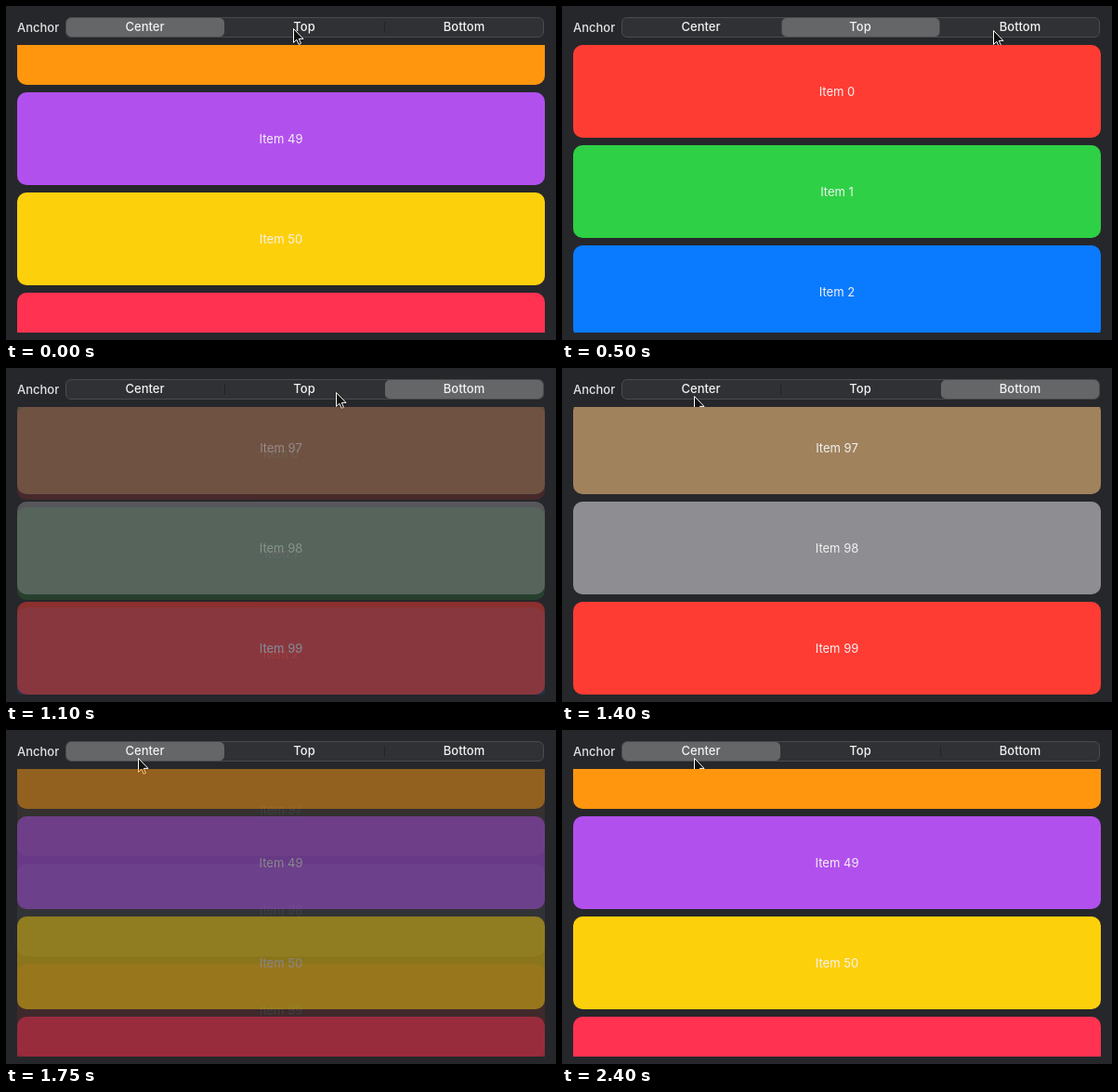
Recreate the animation shown at these times as an HTML page. Size 592 by 360 pixels, loop 2500 ms.

```html
<!DOCTYPE html>
<html lang="en">
<head>
<meta charset="utf-8">
<title>Scroll anchor</title>
<style>
  html, body { margin: 0; width: 100%; height: 100%; overflow: hidden; background: #26272b; }
  body { position: relative; font: 13px Inter, "Liberation Sans", sans-serif; color: #f2f2f2; }
  .stage { position: absolute; left: 0; top: 0; width: 592px; height: 360px; overflow: hidden; }
  .stage * { position: absolute; box-sizing: border-box; white-space: nowrap; }
  .stage, .thumb, .divider, .list, .cursor { animation: 2500ms step-end infinite; }

  .title { left: 12px; top: 13px; line-height: 20px; font-weight: 500; color: #e2e2e3; }
  .picker { left: 64px; top: 12px; width: 515px; height: 22px; border-radius: 6px;
            background: #303134; border: 1px solid #4a4b4e; }
  .thumb { left: 65px; top: 13px; width: 170px; height: 20px; border-radius: 5px;
           background: #646667; animation-name: select; }
  .divider { top: 17px; width: 1px; height: 12px; background: #242528; }
  .d1 { left: 235px; animation-name: d1; }
  .d2 { left: 407px; animation-name: d2; }
  .seg { top: 12px; width: 170px; line-height: 21px; text-align: center; font-weight: 500; }

  .view { left: 12px; top: 42px; width: 568px; height: 310px; overflow: hidden; }
  .list { inset: 0; }
  .item { left: 0; width: 568px; height: 100px; border-radius: 10px;
          line-height: 101px; text-align: center; }
  .center { animation-name: center; }
  .top { animation-name: top; z-index: 2; }
  .bottom { animation-name: bottom; z-index: 3; }

  .cursor { left: 0; top: 0; width: 14px; height: 21px; overflow: visible; animation-name: move;
            filter: drop-shadow(0 1px 1px rgba(0, 0, 0, .4)); }

  @keyframes select {
    0%, 66% { transform: none; }
    10% { transform: translateX(171.5px); }
    40% { transform: translateX(343px); }
  }
  @keyframes d1 { 0%, 66% { opacity: 0; } 40% { opacity: 1; } }
  @keyframes d2 { 0%, 66% { opacity: 1; } 10% { opacity: 0; } }

  /* Incoming list fades in above the outgoing one */
  @keyframes center {
    0% { opacity: 1; z-index: 1; }
    12% { opacity: .75; }
    14% { opacity: .15; }
    16% { opacity: .04; }
    18% { opacity: 0; z-index: 4; }
    68% { opacity: .33; }
    70% { opacity: .47; }
    72% { opacity: .7; }
    74% { opacity: .88; }
    76%, 100% { opacity: 1; z-index: 4; }
  }
  @keyframes top {
    0% { opacity: 0; }
    12% { opacity: .33; }
    14% { opacity: .47; }
    16% { opacity: .7; }
    18% { opacity: .88; }
    20% { opacity: 1; }
    42% { opacity: .75; }
    44% { opacity: .15; }
    46% { opacity: .04; }
    48%, 100% { opacity: 0; }
  }
  @keyframes bottom {
    0% { opacity: 0; }
    42% { opacity: .33; }
    44% { opacity: .47; }
    46% { opacity: .7; }
    48% { opacity: .88; }
    50% { opacity: 1; }
    68% { opacity: .75; }
    70% { opacity: .12; }
    72% { opacity: .04; }
    74%, 100% { opacity: 0; }
  }
  @keyframes move {
    0% { transform: translate(309px, 24px); }
    4% { transform: translate(310px, 24px); }
    14% { transform: translate(330px, 24px); }
    16% { transform: translate(374px, 25px); }
    18% { transform: translate(426px, 26px); }
    20% { transform: translate(464px, 26px); }
    22% { transform: translate(478px, 26px); }
    40% { transform: translate(464px, 26px); }
    42% { transform: translate(415px, 26px); }
    44% { transform: translate(355px, 26px); }
    46% { transform: translate(290px, 27px); }
    48% { transform: translate(225px, 28px); }
    50% { transform: translate(175px, 29px); }
    52% { transform: translate(150px, 30px); }
    54%, 100% { transform: translate(142px, 30px); }
  }
</style>
</head>
<body>
<div class="stage">
  <div class="title">Anchor</div>
  <div class="picker"></div>
  <div class="divider d1"></div>
  <div class="divider d2"></div>
  <div class="thumb"></div>
  <div class="seg" style="left:64.5px">Center</div>
  <div class="seg" style="left:236px">Top</div>
  <div class="seg" style="left:408px">Bottom</div>
  <div class="view">
    <div class="list center"></div>
    <div class="list top"></div>
    <div class="list bottom"></div>
  </div>
  <svg class="cursor" viewBox="0 0 14 21">
    <path d="M.5 .5V15.5L3.9 12.3 6.1 17.4 8.5 16.4 6.3 11.4H11Z" fill="#111" stroke="#fff" stroke-linejoin="round"/>
  </svg>
</div>
<script>
  const PITCH = 108;

  function fill(name, first, y, colors) {
    const list = document.querySelector('.list.' + name);
    colors.forEach((color, i) => {
      const item = document.createElement('div');
      item.className = 'item';
      item.textContent = 'Item ' + (first + i);
      item.style.top = y + i * PITCH + 'px';
      item.style.background = color;
      list.append(item);
    });
  }

  fill('center', 48, -57, ['#ff960e', '#b250ee', '#fdd00c', '#ff3252']);
  fill('top', 0, 0, ['#ff3c33', '#2ed045', '#0a7aff']);
  fill('bottom', 97, -6, ['#a0825c', '#8e8d92', '#ff3c33']);
</script>
</body>
</html>
```
